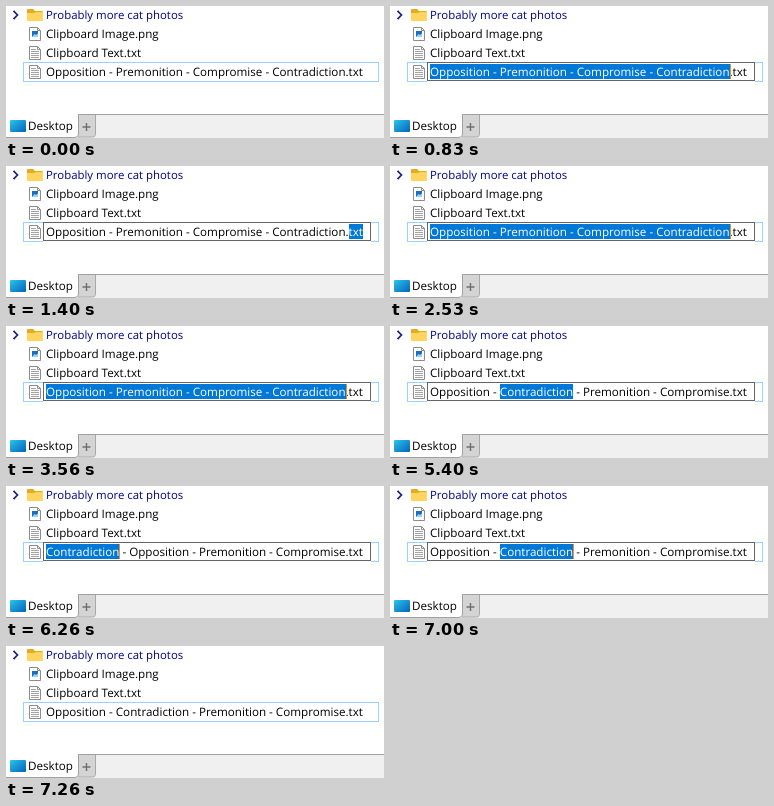
An HTML page that plays this animation: 378x132 px, repeating every 8.8 s.

```html
<!DOCTYPE html>
<html lang="en">
<head>
<meta charset="utf-8">
<title>Inline rename</title>
<style>
  html, body { margin: 0; width: 100%; height: 100%; overflow: hidden; background: #fff; }
  #stage { position: relative; width: 378px; height: 132px; overflow: hidden; }
  svg { position: absolute; left: 0; top: 0; }
  .label {
    position: absolute; left: 40px; height: 15px; white-space: pre; color: #000;
    font: 11.64px/17px "Open Sans", "Noto Sans", sans-serif;
    text-rendering: geometricPrecision;
  }
  .folder { color: #00008b; font-size: 11.4px; }
  .row, .edit { position: absolute; top: 56px; box-sizing: border-box; }
  .row { left: 17px; width: 356px; height: 20px; border: 1px solid #99d1ff; }
  .edit {
    left: 37px; width: 328px; height: 19px; background: #fff;
    border: 1px solid #646464; box-shadow: 0 1px #fff;
  }
  .sel { position: relative; display: inline-block; height: 15px; background: #0078d7; color: #fff; }
  .caret { position: absolute; width: 1px; height: 15px; background: #000; }
  .sel .caret { left: 100%; top: 0; background: #ff8728; }
</style>
</head>
<body>
<div id="stage">
  <svg width="378" height="132" viewBox="0 0 378 132">
    <defs>
      <linearGradient id="screen" x1="0" y1="0" x2="1" y2="1">
        <stop offset="0" stop-color="#2cc3ee"/>
        <stop offset="1" stop-color="#0563b8"/>
      </linearGradient>
      <g id="page">
        <path d="M.5.5h8l3 3v10H.5z" fill="#fff" stroke="#8c8c8c"/>
        <path d="M8.500.500v3h3" fill="none" stroke="#8c8c8c"/>
      </g>
      <g id="textfile">
        <use href="#page"/>
        <path d="M2 3.500h5M2 5.500h8M2 7.500h8M2 9.500h8M2 11.500h8" stroke="#a3a3a3"/>
      </g>
    </defs>

    <path d="M7.500 4.800l4 4.200-4 4.200" fill="none" stroke="#1c1c8c" stroke-width="1.700"/>
    <path d="M21 4q0-1 1-1h5l2 2h7q1 0 1 1v8H21z" fill="#e9a820"/>
    <path d="M21 7h7l1.500-1H37v8q0 1-1 1H22q-1 0-1-1z" fill="#ffd45c"/>

    <use href="#page" x="23" y="21"/>
    <rect x="26" y="25" width="6" height="6" fill="#1d6fb8"/>
    <path d="M26 31l2.500-3 1.500 1 2-1.500V31z" fill="#9fd3f2"/>
    <use href="#textfile" x="23" y="40"/>
    <use href="#textfile" x="23" y="59"/>

    <rect y="108" width="378" height="24" fill="#f0f0f0"/>
    <path d="M72 108.500h306" stroke="#a0a0a0"/>
    <path d="M72 109h17v19q0 3-3 3H72z" fill="#d4d4d4"/>
    <path d="M89.500 109v19q0 3-3 3H72" fill="none" stroke="#a8a8a8"/>
    <path d="M0 108h72v20q0 3-3 3H0z" fill="#fff"/>
    <path d="M72.500 108v20q0 3.500-3.500 3.500H0" fill="none" stroke="#a0a0a0"/>
    <path d="M80.500 117v8M76.500 121h8" stroke="#707070" stroke-width="1.400"/>
    <rect x="4" y="114" width="16" height="12" rx="1" fill="url(#screen)"/>
  </svg>

  <div class="label folder" style="top:1px">Probably more cat photos</div>
  <div class="label" style="top:20px">Clipboard Image.png</div>
  <div class="label" style="top:39px">Clipboard Text.txt</div>
  <div class="row"></div>
  <div class="edit" id="edit" hidden></div>
  <div class="label" id="name" style="top:58px"></div>
  <div class="label" style="left:22px;top:112px">Desktop</div>
</div>

<script>
const LOOP = 8800;
const first = "Opposition - Premonition - Compromise - Contradiction";
const moved = "Opposition - Contradiction - Premonition - Compromise.txt";
const picked = moved.replace("Contradiction", "[$&]");

// start, name, times the hidden caret flips; [..] is selected, | is a bare caret
const steps = [
  [0, first + ".txt"],
  [330, `[${first}].txt`, 830],
  [1400, `${first}.[txt]`, 1900, 2430],
  [2530, `[${first}].txt`, 2530, 3030, 3560, 4060],
  [4330, `${first}|.txt`, 4830],
  [5060, "Opposition - Premonition - [Contradiction] - Compromise.txt"],
  [5330, moved + "|", 5330],
  [5400, picked],
  [5730, "[Contradiction] - Opposition - Premonition - Compromise.txt", 6260],
  [6500, picked, 7000],
  [7230, first + ".txt"],
  [7260, moved]
];

const name = document.getElementById("name");
const edit = document.getElementById("edit");
const caret = '<span class="caret"></span>';
let shown = "";

function draw(now) {
  const t = now % LOOP;
  const [, text, ...flips] = steps.findLast(step => step[0] <= t);
  const mark = flips.filter(at => at <= t).length % 2 ? caret : "";
  const html = text
    .replace("|", mark)
    .replace(/\[(.*)\]/, `<span class="sel">$1${mark}</span>`);
  if (html !== shown) name.innerHTML = shown = html;
  edit.hidden = !/[[|]/.test(text);
}

const start = performance.now();
function tick() {
  draw(performance.now() - start);
  requestAnimationFrame(tick);
}
tick();
</script>
</body>
</html>
```
